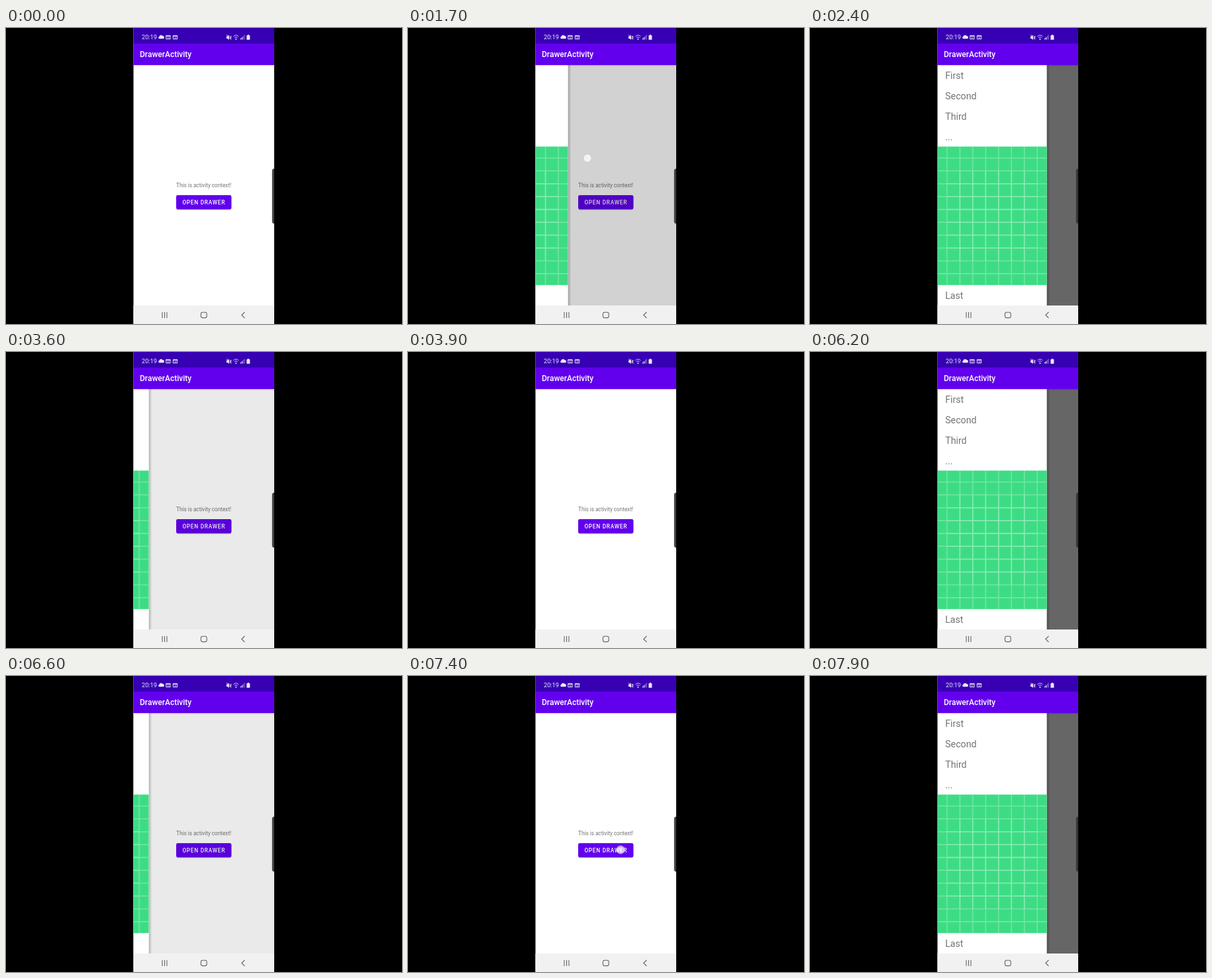
Write an HTML page that moves like this. It is 598 px wide and 448 px high and loops after 8 s.

```html
<!DOCTYPE html>
<html lang="en">
<head>
<meta charset="utf-8">
<title>Drawer demo</title>
<style>
  html, body { margin: 0; width: 100%; height: 100%; overflow: hidden; background: #000; }
  svg { display: block; width: 598px; height: 448px; font-family: Roboto, sans-serif; }
  .item { font-size: 14.2px; fill: #737373; }
</style>
</head>
<body>
<svg viewBox="0 0 598 448">
  <defs>
    <clipPath id="content"><rect x="192.5" y="56" width="212.5" height="364"/></clipPath>
    <clipPath id="picture"><rect x="192.5" y="179.3" width="165.1" height="210"/></clipPath>
    <linearGradient id="down" x2="0" y2="1">
      <stop stop-opacity=".22"/><stop offset="1" stop-opacity="0"/>
    </linearGradient>
    <linearGradient id="side">
      <stop stop-opacity=".24"/><stop offset="1" stop-opacity="0"/>
    </linearGradient>
    <radialGradient id="glow">
      <stop offset=".3" stop-color="#fff" stop-opacity=".78"/>
      <stop offset="1" stop-color="#fff" stop-opacity=".58"/>
    </radialGradient>
  </defs>

  <rect x="192.5" width="212.5" height="448" fill="#fff"/>

  <!-- Activity content, scrim and drawer -->
  <g clip-path="url(#content)">
    <text x="257" y="241.3" font-size="8.2" fill="#757575">This is activity context!</text>
    <rect x="257" y="253.8" width="83.4" height="21.6" rx="2.4" opacity=".2"/>
    <rect x="257" y="253" width="83.4" height="21.4" rx="2.4" fill="#6200ee"/>
    <text x="266.4" y="266.7" font-size="8.25" font-weight="500" letter-spacing=".74" fill="#fff">OPEN DRAWER</text>
    <rect id="scrim" x="192" y="56" width="214" height="364"/>
    <g id="drawer">
      <rect x="357.6" y="56" width="5" height="364" fill="url(#side)"/>
      <rect x="192.5" y="56" width="165.1" height="364" fill="#fff"/>
      <text class="item" x="204.2" y="77.2">First</text>
      <text class="item" x="204.2" y="108.1">Second</text>
      <text class="item" x="204.2" y="139">Third</text>
      <text class="item" x="204.2" y="169.9">...</text>
      <text class="item" x="204.2" y="410">Last</text>
      <g clip-path="url(#picture)">
        <g transform="translate(170 179.3) scale(1.945)">
          <rect width="108" height="108" fill="#3ddc84"/>
          <path id="grid" stroke="#fff" stroke-opacity=".27" stroke-width=".8"/>
          <path id="inner" stroke="#fff" stroke-opacity=".2" stroke-width=".8"/>
        </g>
      </g>
    </g>
    <rect x="192.5" y="56" width="212.5" height="2" fill="url(#down)"/>
  </g>

  <!-- Status bar and app bar -->
  <rect x="192.5" width="212.5" height="24" fill="#3700b3"/>
  <rect x="192.5" y="23.5" width="212.5" height="32.5" fill="#6200ee"/>
  <text x="202" y="44.2" font-size="12" font-weight="500" fill="#fff">DrawerActivity</text>
  <g fill="#eee8fa">
    <text x="205" y="17.3" font-size="9.2">20:19</text>
    <path d="M231.5 16.3a1.9 1.9 0 0 1 0-3.6a2.8 2.8 0 0 1 5-.6a2.1 2.1 0 0 1 .6 4.2z"/>
    <path d="M363.4 11.2h1.3v-.9h2.4v.9h1.3v6.6h-5z"/>
    <path d="M333 12.5h1.6l2.2-2v7.4l-2.2-2H333z"/>
    <path d="M354 17.5v-2h1.2v2zm1.9 0v-3.6h1.2v3.6z"/>
    <path d="M357.8 17.5v-5.4h1v5.4zm1.8 0v-7h1v7z" opacity=".55"/>
    <circle cx="347.4" cy="16.9" r="1"/>
  </g>
  <g fill="none" stroke="#eee8fa" stroke-width=".9">
    <path d="M241.7 11.4h6.4v5.4h-6.4zM252.3 11.4h6.4v5.4h-6.4zM241.7 12.5h6.4M252.3 12.5h6.4M243 15h2M246 14v2M253.6 15h2M256.6 14v2"/>
    <path d="M333 10.2l7.2 7.6M338.2 12l2 4M340.4 12l-2 4"/>
    <path d="M343.5 12.7q3.9-3.6 7.8 0M345.2 14.7q2.2-2 4.4 0"/>
  </g>

  <!-- Navigation bar and edge handle -->
  <rect x="192.5" y="420" width="212.5" height="28" fill="#f1f1f1"/>
  <g fill="none" stroke="#666" stroke-width="1.1">
    <path d="M236 430v9M239.5 430v9M243 430v9M360.4 430l-4.6 4.5l4.6 4.5"/>
    <rect x="294.4" y="430.2" width="8.8" height="8.4" rx="2.6"/>
  </g>
  <path d="M405 213h-1.2q-2 .6-2 3v77q0 2.4 2 3H405z" fill="#333" fill-opacity=".92"/>

  <circle id="touch" r="6.5" fill="url(#glow)" stroke="#777" stroke-opacity=".35" stroke-width=".7"/>
</svg>
<script>
const $ = id => document.getElementById(id);
const LOOP = 8000, STEP = 100, WIDTH = 165.1;

// Crossing lines from first to last, ten units apart, each spanning a..b
function lines(first, last, a, b) {
  let d = '';
  for (let p = first; p <= last; p += 10) d += `M${p} ${a}V${b}M${a} ${p}H${b}`;
  return d;
}
$('grid').setAttribute('d', lines(9, 99, 0, 108));
$('inner').setAttribute('d', lines(29, 79, 19, 89));

// Quintic deceleration from 0 to 1
const settle = (t, start, length) => {
  const p = Math.min(1, Math.max(0, (t - start) / length));
  return 1 - (1 - p) ** 5;
};
const drag = t => .07 + .227 * ((t - 1300) / 400) ** 1.6;

function openness(t) {
  if (t < 1300) return 0;
  if (t < 1850) return drag(t);
  if (t < 3460) return drag(1850) + (1 - drag(1850)) * settle(t, 1850, 300);
  if (t < 5000) return 1 - settle(t, 3460, 430);
  if (t < 6460) return settle(t, 5080, 420);
  if (t < 7400) return 1 - settle(t, 6460, 430);
  return settle(t, 7480, 420);
}

function touchPoint(t) {
  if (t >= 1300 && t < 1850) return [200 + 71 * (t - 1300) / 400, 197];
  if ((t >= 5000 && t < 5100) || (t >= 7400 && t < 7500)) return [321, 263];
}

function draw(now) {
  const t = Math.floor(now % LOOP / STEP) * STEP;
  const open = openness(t), point = touchPoint(t);
  $('scrim').setAttribute('opacity', .6 * open);
  $('drawer').setAttribute('transform', `translate(${(open - 1) * WIDTH} 0)`);
  $('drawer').setAttribute('visibility', open > .002 ? 'visible' : 'hidden');
  $('touch').setAttribute('visibility', point ? 'visible' : 'hidden');
  if (point) $('touch').setAttribute('transform', `translate(${point})`);
}

const start = performance.now();
function tick() {
  draw(performance.now() - start);
  requestAnimationFrame(tick);
}
tick();
</script>
</body>
</html>
```
